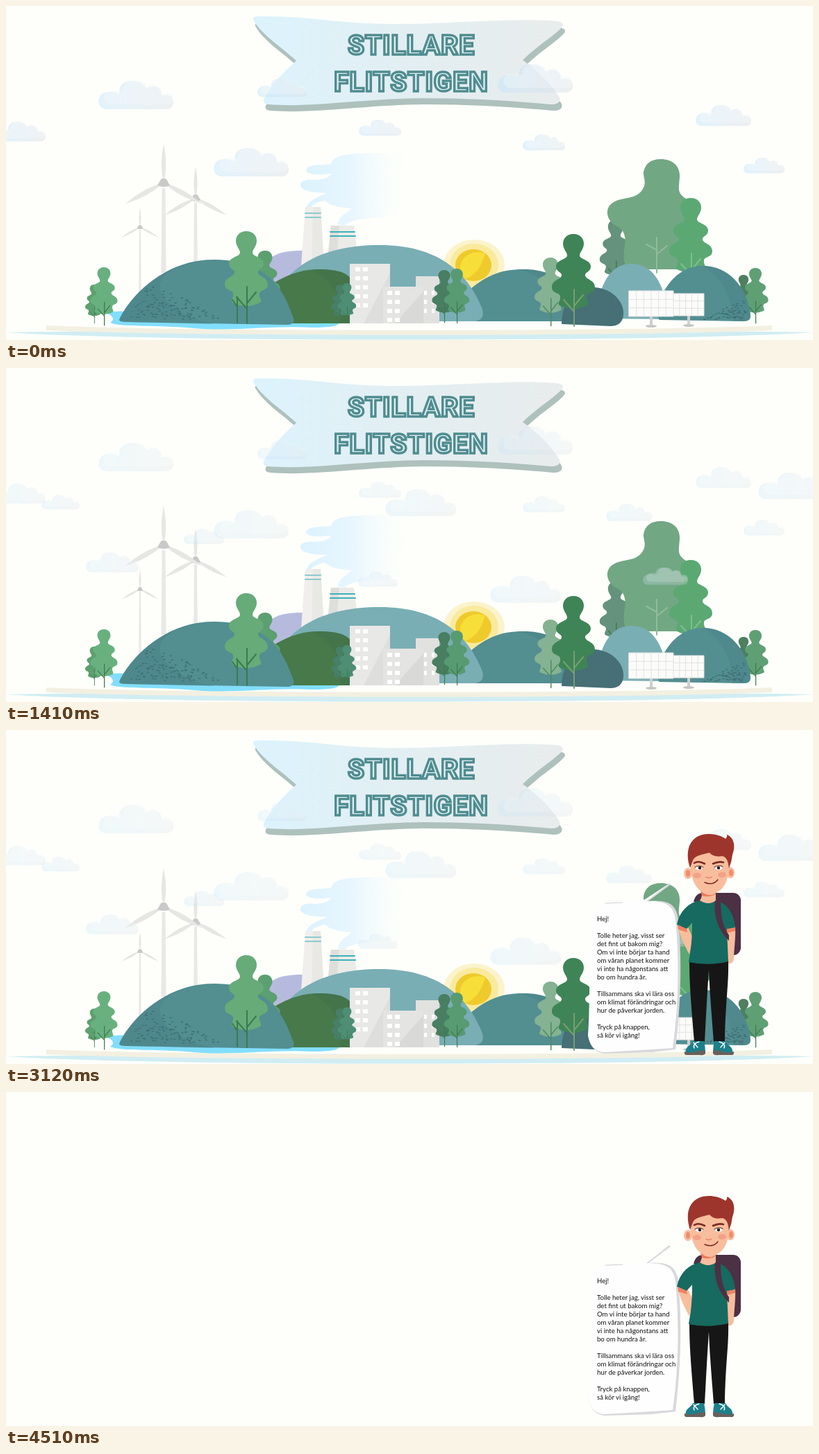
Recreate the animation shown at these times as an HTML page. Size 1162 px wide and 482 px high, loop 6.31 s.

```html
<!DOCTYPE html>
<html lang="sv">
<head>
<meta charset="utf-8">
<style>
  html, body { margin: 0; width: 100%; height: 100%; overflow: hidden; background: #fefffb; }
  svg { display: block; width: 1162px; height: 482px; }
  .title { font: 700 39px Roboto, sans-serif; letter-spacing: 1px; text-anchor: middle; fill: #e0eff3; stroke: #4f8c8f; stroke-width: 3.4; }
  .letter { font: 9.6px Lato, sans-serif; fill: #111; }
</style>
</head>
<body>
<svg id="stage" viewBox="0 0 1162 482">
  <defs>
    <linearGradient id="ribbon"><stop stop-color="#dcf3fd"/><stop offset=".55" stop-color="#e3eef1"/><stop offset="1" stop-color="#e9ecec"/></linearGradient>
    <linearGradient id="mist"><stop stop-color="#c2e3fb"/><stop offset="1" stop-color="#d9dce3"/></linearGradient>
    <linearGradient id="steam"><stop stop-color="#dbf2fe"/><stop offset=".45" stop-color="#e8f6fe"/><stop offset="1" stop-color="#fefffb" stop-opacity="0"/></linearGradient>
    <path id="puff" d="M12 41C-4 41-4 17 14 16Q22 14 30 19C29 5 38 0 49 0C60 0 66 4 69 11C78 4 91 8 91 21C104 18 108 24 108 31Q108 41 96 41Z"/>
    <path id="crown" d="M0 0C10 0 15 7 15 14C15 22 9 26 9 31C9 37 25 37 25 47C25 55 16 55 17 60C18 66 31 66 31 77C31 86 20 84 19 90C18 97 24 99 20 103Q10 108 0 108Q-10 108-20 103C-24 99-18 97-19 90C-20 84-31 86-31 77C-31 66-18 66-17 60C-16 55-25 55-25 47C-25 37-9 37-9 31C-9 26-15 22-15 14C-15 7-10 0 0 0Z"/>
    <path id="banner" d="M356 20Q355 15 362 15C440 14 480 26 560 26C640 26 720 18 780 21Q803 21 802 28C797 38 765 57 744 78C770 97 786 114 797 132Q800 142 784 142C730 137 670 133 600 133C510 134 440 147 378 142Q367 141 372 133C385 110 400 95 418 79C398 60 368 42 356 20Z"/>
    <path id="blade" d="M-1.5-7H1.5C4-22 4-34 0-56C-4-34-4-22-1.5-7Z"/>
  </defs>
  <g id="scene"></g>
  <g id="boy"></g>
</svg>
<script>
const LOOP = 6310, CUT = 4510, ENTER = 1500;
const $ = id => document.getElementById(id);
const shape = (fill, d, extra = '') => `<path fill="${fill}" d="${d}" ${extra}/>`;
const line = (stroke, width, d) => `<path fill="none" stroke="${stroke}" stroke-width="${width}" stroke-linecap="round" d="${d}"/>`;
const rect = (fill, x, y, w, h, r = 0) => `<rect fill="${fill}" x="${x}" y="${y}" width="${w}" height="${h}" rx="${r}"/>`;
const oval = (fill, x, y, rx, ry = rx) => `<ellipse fill="${fill}" cx="${x}" cy="${y}" rx="${rx}" ry="${ry}"/>`;
const place = (x, y, s, content) => `<g transform="translate(${x} ${y}) scale(${s})">${content}</g>`;
const random = n => { const v = Math.sin(n * 127.1) * 43758.5453; return v - Math.floor(v); };

const cloud = ([x, y, w]) => place(x, y, w / 108,
  `<use href="#puff" fill="url(#mist)" opacity=".46"/>
   <use href="#puff" fill="#f4fafd" opacity=".36" transform="translate(8) scale(.92 .84)"/>`);

const tree = (x, y, s, color, bark = '#3c7a50') => place(x, y, s,
  `<use href="#crown" fill="${color}"/>` + line(bark, 2, 'M1 80V133M1 104L14 88M1 112L-14 95'));

const turbine = (x, y, s, base) => {
  const blades = [[0, 1], [119, 1.14], [-119, 1.14]].map(([angle, size]) =>
    `<use href="#blade" fill="#e6e6e5" transform="rotate(${angle}) scale(${size})"/>`).join('');
  return shape('#e8e8e6', `M${x - 2.4 * s} ${y + 8 * s}h${4.8 * s}L${x + 3.6 * s} ${base}h${-7.2 * s}Z`) +
    place(x, y, s, blades + shape('#c9c9c9', 'M-9 4L-4-5Q0-8 4-5L9 4Q0 8-9 4Z'));
};

const windows = (x, y, cols, rows, stepX = 11, stepY = 13, w = 7) => {
  let out = '';
  for (let r = 0; r < rows; r++) for (let c = 0; c < cols; c++) out += rect('#fff', x + c * stepX, y + r * stepY, w, 6);
  return out;
};

const panel = (x, y, w, h, cols) => {
  let grid = '';
  for (let c = 1; c < cols; c++) grid += `M${x + w * c / cols} ${y}v${h}`;
  for (let r = 1; r < 3; r++) grid += `M${x} ${y + h * r / 3}h${w}`;
  const mid = x + w / 2;
  return rect('#cfcfcf', mid - 2, y + h, 4, 13) + oval('#c6c6c6', mid, y + h + 14, 8, 2) +
    rect('#fbfbfa', x, y, w, h) + line('#e2e2e1', 1, grid + `M${x} ${y}h${w}v${h}h${-w}z`);
};

const speckles = (count, top, height, at) => Array.from({ length: count }, (_, i) => {
  const y = top + height * Math.sqrt(random(i + 1));
  return oval('#3d6f73', at(y, random(i + 300)).toFixed(1), y.toFixed(1), 1.9, .8);
}).join('');

const cloudsA = [[133, 108, 108], [299, 205, 108], [362, 105, 70], [708, 84, 108], [508, 164, 61],
  [744, 185, 61], [993, 143, 80], [1062, 219, 59], [-18, 167, 75]];
const cloudsB = [[51, 183, 55], [256, 232, 58], [115, 266, 76], [546, 175, 102], [864, 196, 66],
  [1083, 151, 100], [697, 300, 102], [507, 294, 57], [917, 288, 65]];

const teal = '#538e91', pale = '#79aeb4';
$('scene').innerHTML = [
  // banner
  '<use href="#banner" fill="#aec1bc" transform="translate(3 9)"/><use href="#banner" fill="url(#ribbon)"/>',
  '<g class="title"><text x="583.5" y="70">STILLARE</text><text x="583.5" y="123">FLITSTIGEN</text></g>',
  // ground and water
  shape('#d0edf3', 'M0 471C200 467 960 467 1162 471C960 485 200 485 0 471Z'),
  shape('#f3f0e1', 'M58 461C250 470 900 470 1103 461V468C900 477 250 477 58 468Z'),
  shape('#82defd', 'M145 443Q170 437 190 446L480 456Q482 464 440 464C380 461 330 470 270 465C220 460 165 464 150 457Q160 450 145 443Z'),
  // power station
  shape('url(#steam)', 'M433 290C436 280 450 275 462 270C440 269 424 267 424 258C424 250 440 250 446 251C456 250 466 248 468 242C446 245 432 242 432 237C434 228 450 230 468 228C472 212 500 212 580 212C600 240 590 290 560 302C530 308 498 305 488 317L478 316C478 304 490 299 498 292C480 291 466 288 460 281C450 282 442 286 440 290Z'),
  turbine(193, 319, .48, 415), turbine(273, 277, .8, 380), turbine(227, 255, 1, 385),
  shape('#b6bbdd', 'M360 400C370 360 392 353 426 353H432V420H360Z'),
  shape('#f0efed', 'M431 290H453L458 375H425Z'), shape('#e8e8e5', 'M442 290H453L458 375H440Z'),
  shape('#ebebe8', 'M468 317H501L507 365H463Z'), shape('#dededb', 'M468 317H480L476 365H463Z'),
  line('#8ccbd0', 2, 'M431 299H453M431 305H453'), line('#3ab3bc', 2, 'M467 326H502M467 332H503'),
  // sun and hills
  oval('#fbf3cc', 674, 374, 44, 37), oval('#f9ea9d', 674, 374, 35, 31), oval('#efca2c', 673, 374, 26, 23),
  shape('#f8de38', 'M690 357C684 377 676 389 661 394A26 23 0 0 1 690 357Z'),
  shape(teal, 'M655 420C690 388 712 380 745 380C790 380 826 404 836 455H665Z'),
  shape('#4a8487', 'M740 380C790 378 826 404 836 455H812C806 420 780 392 740 380Z', 'opacity=".5"'),
  shape(pale, 'M400 398C430 360 480 345 538 345C620 345 664 382 686 438Q690 452 676 455H400Z'),
  // right wood
  tree(878, 308, .75, '#64927c'),
  shape('#72a783', 'M943 221C960 221 971 231 970 247C969 262 966 268 976 276C992 286 1000 300 992 318C985 335 990 350 985 380H900C887 378 889 358 891 346C893 330 889 322 878 317C864 309 861 291 875 283C888 275 908 280 917 264C923 254 917 246 918 240C920 228 928 221 943 221Z'),
  line('#8fbd9b', 2, 'M937 334V385M937 358L952 346M937 352L922 344'),
  tree(986, 277, 1, '#5ba873', '#7cc08f'),
  tree(784, 363, .74, '#85b292', '#4c8a63'),
  shape(pale, 'M851 451C852 400 872 372 899 372C930 372 947 395 955 452Z'),
  tree(1062, 388, .48, '#4d7f60'), tree(1079, 378, .6, '#5f9f74'),
  shape('#466f76', 'M800 459C800 425 822 405 847 406C875 408 890 428 889 445Q888 462 870 462Z'),
  shape(teal, 'M941 453C930 445 950 375 1003 375C1050 375 1070 420 1072 446Q1073 456 1060 455Z'),
  shape('#4a8487', 'M1003 375C1050 375 1070 420 1072 446Q1073 456 1060 455H1046C1046 420 1030 390 1003 375Z', 'opacity=".45"'),
  speckles(60, 424, 29, (y, v) => 1066 - v * (8 + (y - 424) * 1.9)),
  tree(817, 329, 1, '#3f8457', '#76a06c'),
  panel(961, 415, 44, 32, 5), panel(897, 411, 64, 37, 6),
  // left hills
  shape('#47794a', 'M385 400C410 385 430 380 450 380C480 380 495 386 500 400V458H385Z'),
  shape('#42704a', 'M440 381C480 378 495 386 500 400V458H482C486 420 470 396 440 381Z', 'opacity=".5"'),
  tree(373, 353, .7, '#5c9f70'),
  shape(teal, 'M163 453C172 430 220 366 300 366C388 366 404 425 414 450Q417 460 404 460L174 456Q163 456 163 453Z'),
  shape('#4a8184', 'M163 453C172 430 220 366 300 366C230 372 200 400 238 432Q260 452 300 459L174 456Q163 456 163 453Z', 'opacity=".4"'),
  speckles(110, 402, 50, (y, v) => 207 - (y - 402) * .7 + v * (14 + (y - 402) * 2.5)),
  tree(346, 325, 1, '#66ab78'), line('#3c7a50', 2, 'M333 420V457M333 434L326 424'),
  tree(127, 402, .42, '#5da06f'), tree(141, 377, .63, '#69b07f'),
  // town
  rect('#e8e8e6', 495, 372, 58, 86), shape('#dededc', 'M553 385V458H515Z'),
  rect('#e1e1df', 590, 390, 34, 68), rect('#e4e4e2', 543, 405, 58, 53), shape('#d9d9d7', 'M601 412V458H560Z'),
  windows(503, 377, 2, 5), windows(549, 411, 2, 4), windows(602, 411, 2, 3, 11, 13, 4),
  tree(481, 402, .42, '#477f68'), tree(491, 400, .43, '#4d8e74'),
  tree(631, 381, .57, '#487e61'), tree(649, 379, .59, '#589a72'),
  `<g id="cloudsA">${cloudsA.map(cloud).join('')}</g><g id="cloudsB">${cloudsB.map(cloud).join('')}</g>`
].join('');

const letter = ['Hej!', '', 'Tolle heter jag, visst ser', 'det fint ut bakom mig?', 'Om vi inte börjar ta hand',
  'om våran planet kommer', 'vi inte ha någonstans att', 'bo om hundra år.', '', 'Tillsammans ska vi lära oss',
  'om klimat förändringar och', 'hur de påverkar jorden.', '', 'Tryck på knappen,', 'så kör vi igång!'];

const skin = '#f8bd9d', shirt = '#166a60', pack = '#4c3044';
const shoe = `${shape('#1c7f89', 'M2 17C0 8 10 6 12 0H28Q30 8 30 17Z')}${shape('#68605c', 'M0 15Q10 18 20 14L30 13V18Q28 21 22 20H2Q-1 19 0 15Z')}${line('#fff', 1.4, 'M13 2L19 9M21 1Q11 4 14 10')}`;
$('boy').innerHTML = [
  // speech bubble
  shape('#d8d8dc', 'M918 247L955 221L957 223L925 247C960 244 968 255 969 285C974 350 970 410 964 461L930 465L862 467C845 465 840 452 838 440Z'),
  shape('#fefefe', 'M846 262Q849 250 862 250L916 247L953 223L922 247C956 246 964 256 965 285C970 350 967 410 960 459L930 461L862 465C845 464 840 452 838 440C842 390 838 300 846 262Z'),
  line('#d0d0d0', 1, 'M863 250L888 249'),
  `<g class="letter">${letter.map((row, i) => `<text x="851" y="${276 + i * 12}">${row}</text>`).join('')}</g>`,
  // backpack and arms
  rect(pack, 1012, 235, 46, 90, 11), shape(pack, 'M990 248Q993 234 1006 235H1030V250Z'),
  shape(skin, 'M967 281C970 298 978 312 984 324L989 300L980 280Z'),
  shape(skin, 'M1037 285L1050 283C1051 300 1048 318 1048 330Q1047 338 1040 337L1036 322Z'),
  // legs and shoes
  shape('#161616', 'M984 332H1040C1041 365 1036 390 1035 450H1019C1016 410 1013 375 1012 346C1010 375 1008 410 1006 450H991C987 400 984 370 984 332Z'),
  place(977, 449, 1, shoe), `<g transform="translate(1048 449) scale(-1 1)">${shoe}</g>`,
  // shirt and strap
  shape(shirt, 'M1000 246Q1012 253 1022 246C1040 250 1048 266 1050 285L1038 288L1040 334Q1012 341 983 335C986 318 988 305 988 278L980 287L966 281C970 260 985 248 1000 246Z'),
  shape('#ef8260', 'M967 281L980 287L981 292L968 288ZM1038 287L1050 285V290L1038 293Z'),
  shape(pack, 'M1021 246H1029C1029 268 1032 284 1041 296V304C1024 288 1019 266 1021 246Z'),
  shape(skin, 'M1002 228H1022V246Q1012 254 999 246Q1003 242 1002 228Z'),
  shape('#ee7c58', 'M1000 232Q1014 244 1024 233L1020 238Q1010 242 1002 239Z'),
  // head
  oval(skin, 982, 207, 6, 8), oval(skin, 1043, 206, 6, 8), oval('#f08d6b', 982, 207, 3, 5), oval('#f08d6b', 1044, 206, 3, 5),
  shape(skin, 'M985 180C985 168 1041 168 1041 182C1043 212 1036 237 1012 236C992 235 984 212 985 180Z'),
  shape('#9d352c', 'M985 199C976 172 986 150 1012 150C1024 150 1032 154 1036 157Q1039 154 1038 151C1050 156 1050 170 1046 180Q1045 190 1041 200C1040 190 1038 184 1032 182Q1018 184 1013 177C1002 180 992 181 989 188Z'),
  line('#7c2b24', 2.6, 'M991 192Q997 188 1006 193M1018 193Q1026 189 1033 191'),
  oval('#fff', 998, 199, 5, 3), oval('#fff', 1026, 199, 5, 3), oval('#2b1d1c', 999, 199, 2.3), oval('#2b1d1c', 1026, 199, 2.3),
  line('#43231f', 1, 'M992 198Q998 194 1004 198M1020 198Q1026 194 1032 197'),
  oval('#f3a287', 995, 210, 6, 4), oval('#f3a287', 1031, 209, 6, 4),
  line('#e5805f', 1.4, 'M1008 212Q1012 215 1016 212'),
  line('#7a2a22', 1.5, 'M1006 220Q1018 225 1025 216')
].join('');

function draw(now) {
  const t = now % LOOP;
  const swap = Math.max(0, 1 - Math.abs(2 * t / CUT - 1));
  $('cloudsA').setAttribute('opacity', 1 - .65 * swap);
  $('cloudsB').setAttribute('opacity', swap);
  $('scene').setAttribute('display', t < CUT ? 'inline' : 'none');
  $('boy').setAttribute('display', t < ENTER ? 'none' : 'inline');
}
function tick() {
  draw(performance.now());
  requestAnimationFrame(tick);
}
tick();
</script>
</body>
</html>
```
